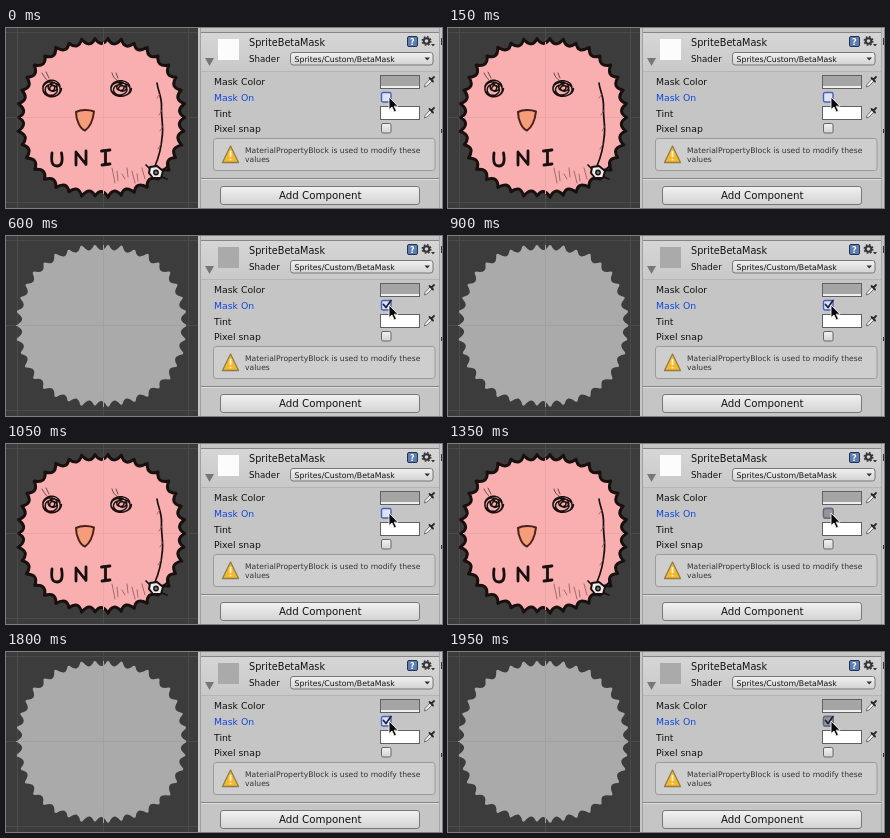
Write an HTML page that moves like this. It is 436x180 px and loops after 2100 ms.

```html
<!DOCTYPE html>
<html lang="en">
<head>
<meta charset="utf-8">
<title>Sprite mask toggle</title>
<style>
html, body { margin: 0; width: 436px; height: 180px; overflow: hidden; background: #c2c2c2; }
svg { display: block; }
text { font-family: "DejaVu Sans", "Open Sans", sans-serif; fill: #111; }
.ink { fill: none; stroke: #17100f; stroke-linecap: round; stroke-linejoin: round; }
.label { font-size: 9.3px; }

/* unchecked 0-600 and 1050-1500 ms, checked otherwise */
.on, .off, .press { animation: 2100ms step-end infinite; }
.on { animation-name: on; }
.off { animation-name: off; }
.press { animation-name: press; }
@keyframes on {
  0%, 50% { opacity: 0; }
  28.571%, 71.428%, 100% { opacity: 1; }
}
@keyframes off {
  0%, 50% { opacity: 1; }
  28.571%, 71.428%, 100% { opacity: 0; }
}
@keyframes press {
  0%, 71.428% { opacity: 0; }
  64.285%, 92.857%, 100% { opacity: 1; }
}
</style>
</head>
<body>
<svg width="436" height="180" viewBox="0 0 436 180">
  <defs>
    <linearGradient id="button" x2="0" y2="1">
      <stop stop-color="#f2f2f2"/><stop offset="1" stop-color="#d2d2d2"/>
    </linearGradient>
    <linearGradient id="head" x2="0" y2="1">
      <stop stop-color="#d6d6d6"/><stop offset="1" stop-color="#c9c9c9"/>
    </linearGradient>
    <path id="body" stroke-width="3" stroke-linejoin="round"/>
    <g id="dropper">
      <path d="M.5 12L1 9.500L6 4L8 6L3 11Z" fill="#f2f2f2" stroke="#555" stroke-width=".8"/>
      <path d="M5.500 3L9 6.500M7.500 4.500L10 2" stroke="#2a2a2a" stroke-width="1.800" stroke-linecap="round"/>
    </g>
    <rect id="box" x=".5" y=".5" width="9.500" height="9.500" rx="1.500"/>
  </defs>

  <!-- scene -->
  <rect width="192" height="180" fill="#3c3c3c"/>
  <path d="M11.500 0V180M97.500 0V180M182.500 0V180M0 4.500H192M0 89.500H192M0 174.500H192" stroke="#4a4a4a" fill="none"/>

  <g class="off">
    <use href="#body" fill="#f9afb0" stroke="#17100f"/>
    <path d="M97.500 14V166M15 89.500H176" stroke="#eba6a7"/>
    <g class="ink" stroke-width="1.400">
      <path id="eyeL"/>
      <path id="eyeR"/>
      <path d="M36 45C38 49 40 51 42 53M40 44L43 50M106 45C107 49 109 51 112 53M110 45L112 50" stroke="#5c3b3b" stroke-width=".9"/>
      <path d="M70 84C75 81.500 83 81.500 88 83.500C87 92 84 99 79 102.500C74 101 70 92 70 84Z" fill="#f59d7b" stroke="#4a2119" stroke-width="2"/>
      <path d="M46 125C45 134 46 138 51 138C56 138 57 133 55.500 125M70 137V124L80 136.500V123M95.500 123L104 122M99.500 123V136M96 137L104 136" stroke-width="2.800"/>
      <path d="M151 55C152 63 156 69 155.500 79C155 91 158 99 156 110C155 122 152 131 149 138" stroke-width="1.700"/>
      <path d="M154 66L151 70M156 82L153 87M157 98L154 103M155 116L152 121" stroke="#8d5a5a" stroke-width=".8"/>
      <path id="hatch" stroke="#8d5858" stroke-width=".8"/>
      <path d="M144 139L151 138L157 143L155 150L147 150L143 145Z" fill="#eee" stroke-width="2"/>
      <path d="M157 142L163 137M156 149L161 151M143 140L140 137" stroke-width="1.700"/>
      <circle cx="150" cy="144.500" r="2.200" fill="#777"/>
    </g>
  </g>
  <g class="on">
    <use href="#body" fill="#aaa" stroke="#aaa"/>
    <path d="M97.500 9V171M10 89.500H180" stroke="#a1a1a1"/>
  </g>

  <!-- inspector -->
  <rect x="192" width="244" height="180" fill="#c5c5c5"/>
  <path d="M194.500 0V180" stroke="#a0a0a0"/>
  <rect x="195" y="5" width="238" height="38" fill="url(#head)"/>
  <path d="M195 4.500H433M195 150.500H433" stroke="#858585"/>
  <path d="M195 43.500H433" stroke="#b5b5b5"/>
  <path d="M195 151.500H433" stroke="#dedede"/>
  <path d="M433.500 0V180" stroke="#a5a5a5"/>
  <path d="M435.500 10V17M435.500 101V105" stroke="#333"/>

  <path d="M199 30H208L203.500 38Z" fill="#777"/>
  <rect x="212" y="11" width="21" height="21" fill="#fcfcfc"/>
  <rect class="on" x="212" y="11" width="21" height="21" fill="#aaa"/>
  <text x="243" y="18" font-size="9.7">SpriteBetaMask</text>
  <text x="243" y="34" font-size="8.7">Shader</text>
  <rect x="284.500" y="24.500" width="142.500" height="12.500" rx="2.500" fill="url(#button)" stroke="#777"/>
  <text x="288.500" y="33.700" font-size="7.8">Sprites/Custom/BetaMask</text>
  <path d="M418.500 29.500H424L421.250 32.500Z" fill="#333"/>

  <rect x="401.500" y="8.500" width="10" height="10" rx="1.500" fill="#5b7fb4" stroke="#22324d"/>
  <text x="404" y="17" font-size="8" font-weight="bold" style="fill:#fff">?</text>
  <circle cx="420.500" cy="13" r="2.800" fill="none" stroke="#333" stroke-width="2"/>
  <circle cx="420.500" cy="13" r="4.300" fill="none" stroke="#333" stroke-width="1.400" stroke-dasharray="1.700 1.680"/>
  <path d="M425 16H429L427 18.500Z" fill="#333"/>

  <g class="label">
    <text x="208" y="57">Mask Color</text>
    <text x="208" y="73" style="fill:#1646d8">Mask On</text>
    <text x="208" y="88.500">Tint</text>
    <text x="208" y="104">Pixel snap</text>
  </g>
  <rect x="374.500" y="47.500" width="39" height="13" fill="#a5a5a5" stroke="#606060"/>
  <path d="M375 59H413" stroke="#f0f0f0" stroke-width="2"/>
  <rect x="374.500" y="78.500" width="39" height="13" fill="#fff" stroke="#606060"/>
  <use href="#dropper" x="418" y="47"/>
  <use href="#dropper" x="418" y="78"/>

  <use href="#box" x="375" y="64" fill="#dde3f5" stroke="#4a60c0" stroke-width="1.400"/>
  <use class="press" href="#box" x="375" y="64" fill="#939599" stroke="#686c75" stroke-width="1.300"/>
  <path class="on ink" d="M377.500 68.500L380 71.500L385 64.500" style="stroke:#1c2540" stroke-width="1.800"/>
  <use href="#box" x="375" y="95" fill="url(#button)" stroke="#666"/>

  <rect x="207.500" y="110.500" width="221.500" height="32" rx="2.500" fill="#cecece" stroke="#9a9a9a"/>
  <path d="M224.500 118L232.500 134.500H216.500Z" fill="#f6b92c" stroke="#8f7c4c" stroke-width="1.300" stroke-linejoin="round"/>
  <path d="M224.500 123V129M224.500 130.800V132.300" stroke="#fff6dc" stroke-width="1.800"/>
  <text font-size="7.64" style="fill:#333"><tspan x="239" y="124.700">MaterialPropertyBlock is used to modify these</tspan><tspan x="239" y="134">values</tspan></text>

  <rect x="214.500" y="158.500" width="199" height="18" rx="2.500" fill="url(#button)" stroke="#777"/>
  <text x="273" y="171" font-size="10.25">Add Component</text>

  <path d="M383 69V81.500L386 79L388.200 84L390.500 83L388.200 78.200H392Z" fill="#0a0a0a" stroke="#f4f4f4" stroke-width=".9" stroke-linejoin="round"/>
</svg>
<script>
const TAU = Math.PI * 2;
const setPath = (id, d) => document.getElementById(id).setAttribute("d", d);

// Point on a rounded-square outline, pulled in by `dent`
function rim(angle, dent) {
  const c = Math.cos(angle), s = Math.sin(angle);
  const k = (Math.abs(c / 84) ** 2.25 + Math.abs(s / 80) ** 2.25) ** (-1 / 2.25) - dent;
  return `${(95.5 + k * c).toFixed(1)} ${(89.5 + k * s).toFixed(1)}`;
}

// Pointed teeth with hollow gaps between them
function teeth(count) {
  const tip = i => rim(i / count * TAU, 0.7 + 0.7 * Math.sin(i * 2.7));
  let d = "M" + tip(0);
  for (let i = 1; i <= count; i++) {
    d += `Q${rim((i - 0.5) / count * TAU, 11)} ${tip(i % count)}`;
  }
  return d + "Z";
}

// Scribbled eye: loops of wobbling size
function scribble(cx, cy, rx, ry) {
  const points = [];
  for (let t = 0; t < TAU * 5; t += 0.3) {
    const size = 0.62 + 0.38 * Math.cos(t * 0.43);
    points.push(`${(cx + rx * size * Math.cos(t)).toFixed(1)} ${(cy + ry * size * Math.sin(t)).toFixed(1)}`);
  }
  return "M" + points.join("L");
}

function hatching() {
  let d = "";
  for (let i = 0; i < 7; i++) {
    const x = 106 + i * 5;
    d += `M${x} ${140 + i % 3 * 3}L${x + 3 - i % 2 * 2} ${155 - i % 4 * 2}`;
  }
  return d;
}

setPath("body", teeth(38));
setPath("eyeL", scribble(46, 60.5, 9.5, 8.5));
setPath("eyeR", scribble(115, 60.5, 10.5, 8));
setPath("hatch", hatching());
</script>
</body>
</html>
```
